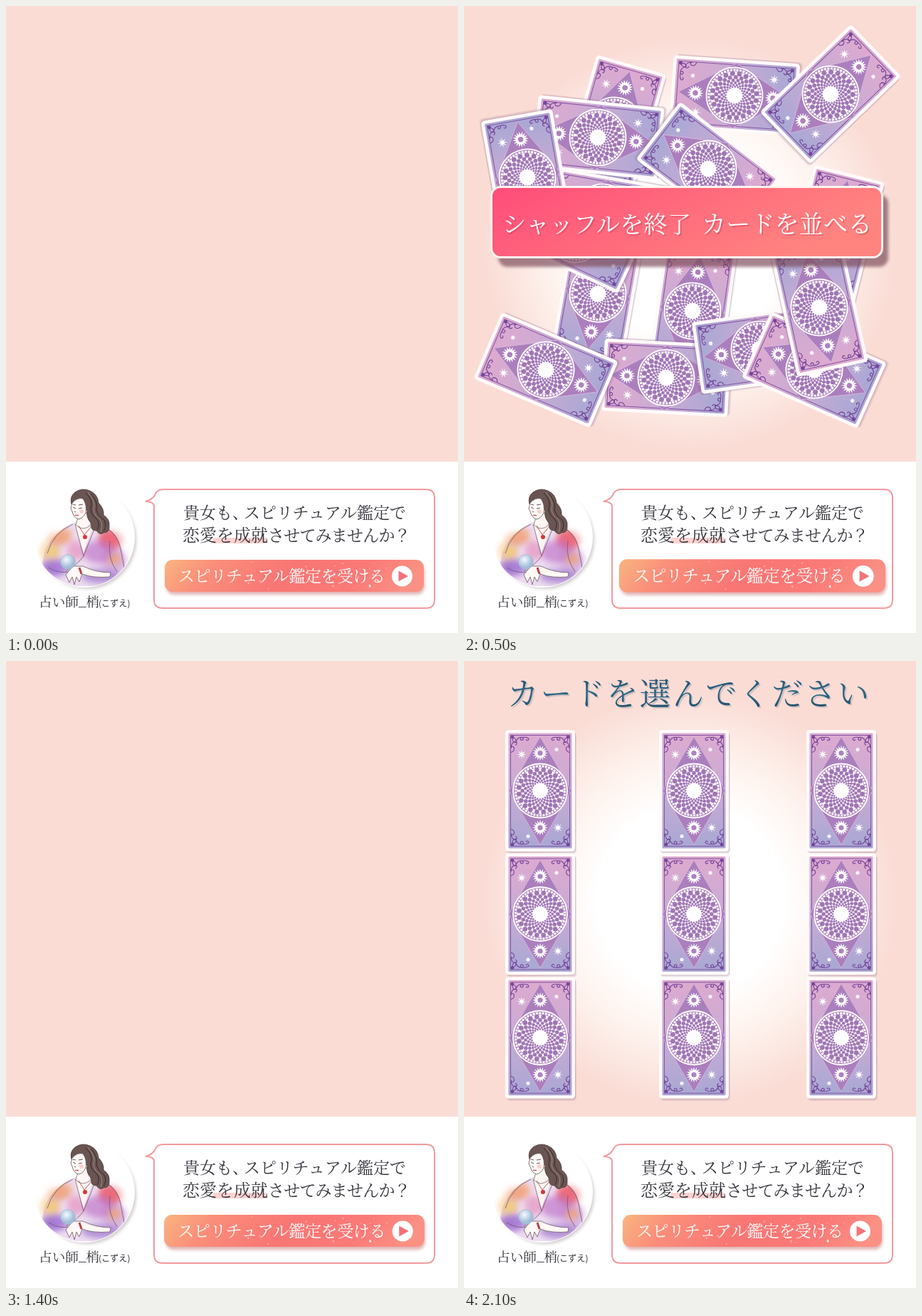
An HTML page for the animation above (2670 ms loop, 635 by 882 pixels).

```html
<!DOCTYPE html>
<html lang="ja">
<head>
<meta charset="utf-8">
<style>
html, body { margin: 0; width: 100%; height: 100%; overflow: hidden; background: #fff; }
svg { display: block; width: 100vw; height: 100vh; }
text { font-family: "Noto Serif CJK JP", "Noto Sans CJK JP", "Noto Sans CJK", serif; font-weight: 400; }
.reading { font-family: "Noto Sans CJK JP", "Noto Sans CJK", sans-serif; font-weight: 500; }
</style>
</head>
<body>
<svg viewBox="0 0 635 882" preserveAspectRatio="none">
  <defs>
    <radialGradient id="glow" gradientUnits="userSpaceOnUse" cx="318" cy="335" r="290">
      <stop offset=".45" stop-color="#fff"/>
      <stop offset=".68" stop-color="#fef3ee"/>
      <stop offset="1" stop-color="#fadcd5"/>
    </radialGradient>
    <linearGradient id="cardFill" x2="0" y2="1">
      <stop offset=".05" stop-color="#dcaad0"/>
      <stop offset=".5" stop-color="#c8abd4"/>
      <stop offset=".95" stop-color="#aba8d4"/>
    </linearGradient>
    <linearGradient id="banner" x2="1" y2=".35">
      <stop offset="0" stop-color="#ff4b7a"/>
      <stop offset=".5" stop-color="#ff6a7c"/>
      <stop offset="1" stop-color="#ff8480"/>
    </linearGradient>
    <linearGradient id="ink" x2=".06" y2="1">
      <stop offset="0" stop-color="#1d3f60"/>
      <stop offset=".55" stop-color="#2f6a86"/>
      <stop offset="1" stop-color="#1f4866"/>
    </linearGradient>
    <linearGradient id="ctaFill" x2="1" y2=".1">
      <stop offset="0" stop-color="#f9b580"/>
      <stop offset=".2" stop-color="#fa8e7a"/>
      <stop offset=".5" stop-color="#f87674"/>
      <stop offset=".8" stop-color="#fa7a77"/>
      <stop offset="1" stop-color="#fb9084"/>
    </linearGradient>
    <radialGradient id="ball" cx=".4" cy=".35">
      <stop offset="0" stop-color="#f4fbff"/>
      <stop offset="1" stop-color="#a3bdd8"/>
    </radialGradient>
    <filter id="soft" x="-20%" y="-20%" width="140%" height="140%"><feGaussianBlur stdDeviation="2"/></filter>
    <filter id="wash" x="-40%" y="-40%" width="180%" height="180%"><feGaussianBlur stdDeviation="4.5"/></filter>
    <clipPath id="disc"><circle cx="110" cy="747" r="70"/></clipPath>
    <clipPath id="robe"><path d="M58 800Q46 790 56 764Q66 742 92 728L104 724L124 726Q154 734 161 760Q170 776 166 797L150 816H74Z"/></clipPath>
    <g id="card"></g>
  </defs>

  <rect width="635" height="882" fill="#fff"/>
  <rect width="635" height="641" fill="#fadcd5"/>

  <g id="shuffle">
    <rect width="635" height="641" fill="url(#glow)"/>
    <g id="pile"></g>
    <rect x="48" y="265" width="548" height="102" rx="13" fill="#7a4a58" opacity=".68" filter="url(#soft)"/>
    <rect x="38.5" y="254.5" width="549" height="99" rx="13" fill="url(#banner)" stroke="#fff3f0" stroke-width="3"/>
    <g id="bannerText"></g>
  </g>

  <g id="choose">
    <rect width="635" height="641" fill="url(#glow)"/>
    <g font-size="44" letter-spacing="2.4">
      <text x="63" y="64" fill="#8b8f9a" opacity=".35">カードを選んでください</text>
      <text x="61" y="62" fill="url(#ink)">カードを選んでください</text>
    </g>
    <g id="grid"></g>
  </g>

  <g id="reader">
    <circle cx="114" cy="751" r="69" fill="#a89aa2" opacity=".5" filter="url(#soft)"/>
    <circle cx="110" cy="747" r="71" fill="#fff"/>
    <g clip-path="url(#disc)">
      <g id="blots" filter="url(#wash)"></g>
      <g clip-path="url(#robe)">
        <rect x="40" y="715" width="140" height="110" fill="#c48bd0" opacity=".3"/>
        <g id="tints" filter="url(#wash)"></g>
      </g>
      <path d="M96 730L109 770L122 731Q112 738 104 728Z" fill="#fff5f1"/>
      <path d="M94 729Q66 741 58 770M97 729L109 774L126 731M126 729Q156 736 161 764L166 790M109 774Q100 786 84 795M146 752Q142 776 156 796M60 790Q76 800 92 795" fill="none" stroke="#6d5a70" stroke-width=".8"/>
    </g>
    <path d="M102 716L98 730Q108 740 119 730L117 712Z" fill="#fff8f5" stroke="#6b5c5e" stroke-width=".7"/>
    <path d="M92 701Q89 690 97 684Q107 677 118 682Q129 687 130 699Q138 707 137 716Q146 722 145 731Q146 741 137 741Q132 745 127 738Q118 738 120 728Q112 720 114 710Q109 704 110 696Q103 693 92 701Z" fill="#6a5552" stroke="#453634" stroke-width=".8"/>
    <path d="M93 699Q100 691 108 693Q114 701 112 713Q108 721 102 722Q95 720 93 711L91 707Z" fill="#fffaf8" stroke="#5e5052" stroke-width=".8"/>
    <path d="M112 685Q123 695 119 707Q119 716 127 721Q133 728 128 737M119 686Q130 698 127 709Q130 718 138 723Q142 731 137 739" fill="none" stroke="#35292a" stroke-width="1"/>
    <path d="M115 684Q127 697 123 708Q124 717 132 722Q137 729 133 740" fill="none" stroke="#a08c86" stroke-width="1"/>
    <path d="M94 705L98 707M102 707L107 706M94 701L98 702M102 702L108 701M98 712L96 711" fill="none" stroke="#4d4044" stroke-width=".9"/>
    <path d="M97 716.500H102" stroke="#d55b62" stroke-width="1.6"/>
    <circle cx="106" cy="711" r="3" fill="#f8b3b0" opacity=".6"/>
    <path d="M102 731L110 744L121 731" fill="none" stroke="#b5484f" stroke-width=".9"/>
    <circle cx="111" cy="747" r="3" fill="#d4343f"/>
    <path d="M147 797Q126 797 108 788L94 788L84 800L89 811L93 803L96 814L99 803L103 810L107 799Q122 805 146 803Z" fill="#fff8f5" stroke="#6b5c5e" stroke-width=".8"/>
    <path d="M103 790L106 799" stroke="#b9404d" stroke-width="3"/>
    <circle cx="87" cy="782" r="10.5" fill="url(#ball)" stroke="#9fb2cb" stroke-width=".6"/>
  </g>

  <g fill="#35333b">
    <text x="46" y="845" font-size="18.7">占い師_梢</text>
    <text class="reading" x="130" y="845" font-size="12.2">(こずえ)</text>
  </g>

  <path d="M221 680H590Q602 680 602 692V835Q602 847 590 847H220Q208 847 208 835V703Q207 697 196 697Q206 694 209 688Q212 680 221 680Z" fill="#fff" stroke="#f29a9e" stroke-width="2"/>
  <rect x="290" y="748" width="77" height="8" rx="4" fill="#fcd3d1"/>
  <g fill="#35333b" font-size="23">
    <text x="249" y="721">貴女も、</text>
    <text x="334" y="721">スピリチュアル鑑定で</text>
    <text x="248" y="753" font-size="24">恋愛を成就</text>
    <text x="368" y="753" letter-spacing="-.8">させてみませんか？</text>
  </g>

  <g id="cta">
    <rect x="225" y="784" width="363" height="44" rx="11" fill="#c4696c" opacity=".5" filter="url(#soft)"/>
    <rect x="223" y="779" width="364" height="45" rx="11" fill="url(#ctaFill)"/>
    <g id="sparks"></g>
    <text x="242" y="810" font-size="23" letter-spacing="-.5" fill="#fff">スピリチュアル鑑定を受ける</text>
    <circle cx="556.5" cy="802" r="14.5" fill="#fff"/>
    <path d="M551.5 794.5V809.5L565 802Z" fill="#f5727a"/>
  </g>
</svg>
<script>
const LOOP = 2670, STEP = 50, BEAT = LOOP / 2, SWELL = 670;
const $ = id => document.getElementById(id);
const times = (n, f) => Array.from({ length: n }, (_, i) => f(i)).join('');
const clamp = v => Math.max(0, Math.min(1, v));
const ramp = (t, a, b) => clamp((t - a) / (b - a));

function dot(x, y, r, fill, alpha = 1) {
  return `<circle cx="${x}" cy="${y}" r="${r}" fill="${fill}" opacity="${alpha}"/>`;
}

function star(x, y, rays, outer, inner) {
  const pts = times(rays * 2, i => {
    const r = i % 2 ? inner : outer, a = i * Math.PI / rays;
    return `${(x + r * Math.sin(a)).toFixed(2)},${(y - r * Math.cos(a)).toFixed(2)} `;
  });
  return `<polygon points="${pts}" fill="#fff"/>`;
}

const sun = y => star(0, y, 16, 11, 6.3) + dot(0, y, 3.6, '#ae82be');

// Staggered rings of dots leave a white net between them.
function lace() {
  return times(6, k => {
    const r = 12 * 1.2 ** k;
    return times(20, i => {
      const a = (i + k % 2 / 2) * Math.PI / 10;
      return dot((r * Math.cos(a)).toFixed(2), (r * Math.sin(a)).toFixed(2), (r * .112).toFixed(2), '#a176b6');
    });
  });
}

function corner(sx, sy) {
  return `<g transform="scale(${sx} ${sy})" fill="none" stroke="#74459a" stroke-width="1.1">
    <path d="M-41-54q6-2 4-7q-3-3-4 1M-41-61q1-8 7-8q3 3-1 5M-39-75q6 1 5 7q-5 1-5-7M-34-69q2-7 9-6q3 3-1 4q-3-1-1-3M-25-75q7-1 9 2q-1 4-4 1"/>
    <circle cx="-39" cy="-75.5" r="1.8" fill="#74459a"/></g>`;
}

$('card').innerHTML = `
  <rect x="-47" y="-82" width="98" height="171" rx="5" fill="#8b6480" opacity=".16"/>
  <rect x="-48" y="-84" width="98" height="171" rx="5" fill="#8b6480" opacity=".22"/>
  <rect x="-49" y="-85.5" width="98" height="171" rx="4.5" fill="#fffafa"/>
  <rect x="-44.5" y="-81" width="89" height="162" rx="1.5" fill="url(#cardFill)"/>
  <rect x="-41.5" y="-78" width="83" height="156" fill="none" stroke="#8455a3"/>
  <path d="M0-76L44 0L0 76L-44 0Z" fill="#ab7fbd" stroke="#d9b8dc" stroke-width=".8"/>
  <circle r="38" fill="#ab7fbd" stroke="#fff" stroke-width="1.8"/>
  <circle r="34.6" fill="none" stroke="#fff" stroke-width="3" stroke-dasharray="3 1.35"/>
  <circle r="32.6" fill="#fff"/>${lace()}${dot(0, 0, 9.5, '#fff')}
  ${sun(-53)}${sun(52)}${star(-26, -51, 8, 7, 2.2)}${star(25, 52, 8, 7, 2.2)}
  ${dot(23, -58, 2.6, '#fff', .85)}${dot(-17, 64, 2.6, '#fff', .85)}
  ${corner(1, 1)}${corner(-1, 1)}${corner(1, -1)}${corner(-1, -1)}`;

const place = (x, y, turn = 0, size = 1) =>
  `<use href="#card" transform="translate(${x} ${y}) rotate(${turn}) scale(${size})"/>`;

// x, y, turn; lowest card first
const pile = [
  [211, 168, 16], [188, 405, 10], [157, 321, -65], [195, 290, -80],
  [188, 185, -84], [380, 126, -86], [89, 241, 170], [343, 229, 127.4],
  [515, 124, 46], [520, 322, 14], [321, 429, 8], [284, 523, -87],
  [115, 512, -67], [415, 483, 82], [492, 512, -66], [499, 424, 167.6]
];
$('pile').innerHTML = pile.map(([x, y, a]) => place(x, y, a, 1.04)).join('');

$('grid').innerHTML = [182.5, 356, 530].map(y =>
  [107, 323, 530].map(x => place(x, y)).join('')).join('');

const bannerText = (shift, fill, alpha) =>
  `<g transform="translate(${shift} ${shift})" fill="${fill}" opacity="${alpha}">
    <text x="54" y="319" font-size="33.4">シャッフルを終了</text>
    <text x="334" y="319" font-size="34.2">カードを並べる</text></g>`;
$('bannerText').innerHTML = bannerText(2, '#b8324f', .35) + bannerText(0, '#fff', 1);

const blot = ([x, y, rx, ry, c, o]) =>
  `<ellipse cx="${x}" cy="${y}" rx="${rx}" ry="${ry}" fill="${c}" opacity="${o}"/>`;
$('blots').innerHTML = [
  [62, 768, 14, 16, '#f6cf96', .7], [72, 750, 14, 10, '#f4b28e', .6],
  [148, 752, 16, 14, '#f0908f', .6], [60, 792, 14, 10, '#b48ad6', .6],
  [152, 780, 18, 18, '#c18bd2', .5]
].map(blot).join('');
$('tints').innerHTML = [
  [76, 745, 17, 12, '#f2a06f', .75], [64, 768, 9, 9, '#f3cc72', .9],
  [146, 750, 16, 14, '#ec5f6c', .85], [130, 768, 22, 16, '#bd70c6', .65],
  [70, 790, 18, 12, '#9a68cf', .75], [134, 802, 28, 10, '#9468c6', .65],
  [98, 766, 12, 14, '#e79bc4', .8], [152, 778, 9, 8, '#f0a06b', .8]
].map(blot).join('');

let seed = 7;
const rand = () => (seed = seed * 16807 % 2147483647) / 2147483647;
$('sparks').innerHTML = times(46, () =>
  dot((330 + 205 * rand()).toFixed(1), (782 + 39 * rand()).toFixed(1),
    (.4 + 1.1 * rand() ** 2).toFixed(2), '#fff', (.3 + .5 * rand()).toFixed(2)));

function draw(t) {
  const fadeIn = ramp(t, 0, 380), fadeOut = 1 - ramp(t, 1175, 1375);
  $('shuffle').setAttribute('opacity', Math.min(fadeIn, fadeOut));
  $('choose').setAttribute('opacity', ramp(t, 1600, 2100));
  const swell = Math.sin(Math.PI * clamp(t % BEAT / SWELL)) ** 2;
  const size = 1 + .055 * swell;
  $('cta').setAttribute('transform', `translate(405 801.5) scale(${size}) translate(-405 -801.5)`);
}

const start = performance.now();
function tick() {
  const t = (performance.now() - start) % LOOP;
  draw(Math.floor(t / STEP) * STEP);
  requestAnimationFrame(tick);
}
tick();
</script>
</body>
</html>
```
